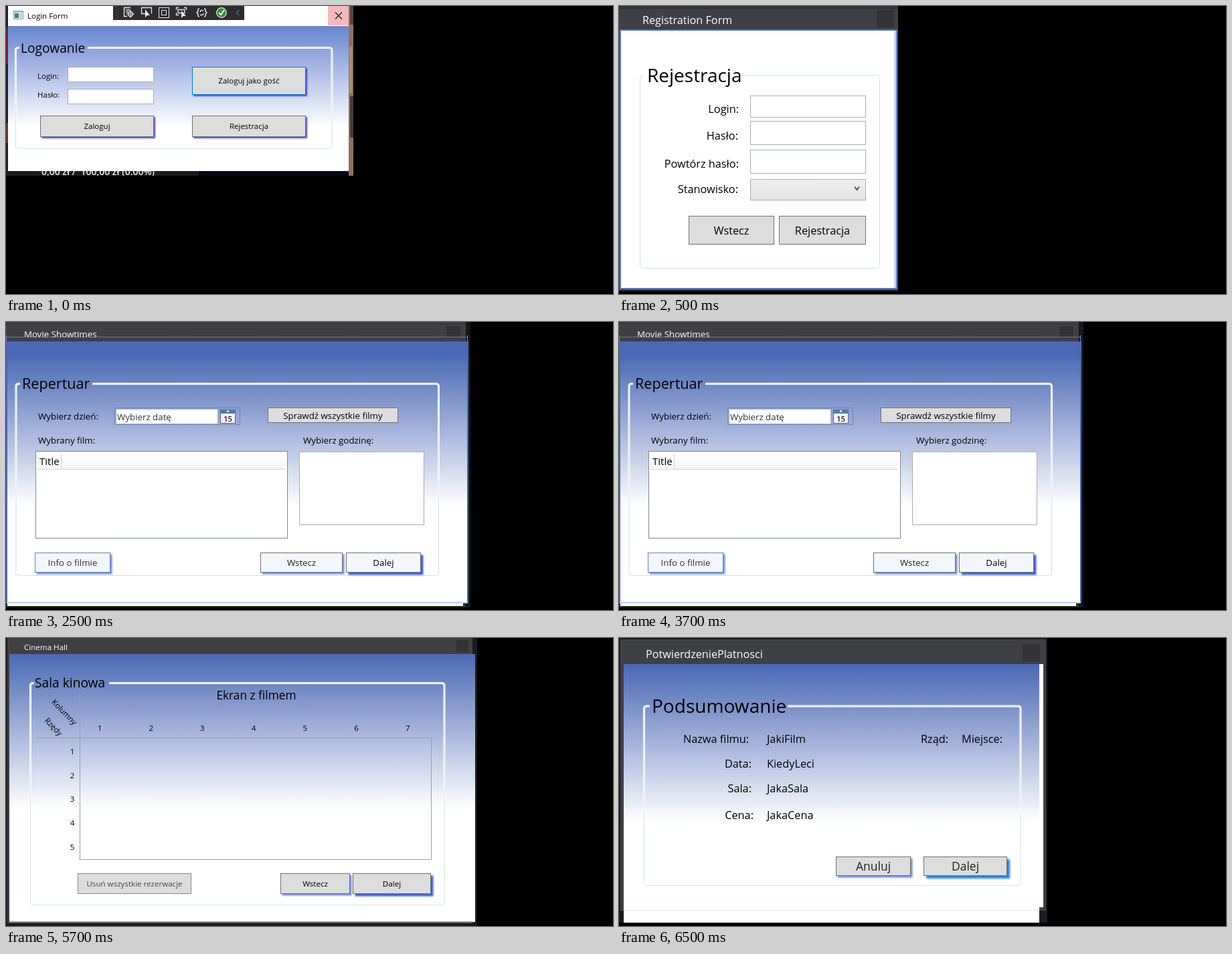
Write an HTML page that moves like this. It is 907x431 px and loops after 8 s.

```html
<!DOCTYPE html>
<html lang="pl">
<head>
<meta charset="utf-8">
<title>Cinema booking windows</title>
<style>
html, body { margin: 0; width: 100%; height: 100%; overflow: hidden; background: #000; }
svg { display: block; }
text { font-family: "Open Sans", "Noto Sans", sans-serif; white-space: pre; }
</style>
</head>
<body>
<svg id="stage" width="907" height="431" viewBox="0 0 907 431"></svg>
<script>
const WHITE = '#fff', BAR = '#3f3f46', FACE = '#ddd', EDGE = '#707070', FIELD = '#abadb3';

const rect = (x, y, w, h, fill, extra = '') =>
  `<rect x="${x}" y="${y}" width="${w}" height="${h}" fill="${fill}" ${extra}/>`;
const box = (x, y, w, h, fill, stroke, extra = '') =>
  rect(x + .5, y + .5, w - 1, h - 1, fill, `stroke="${stroke}" ${extra}`);
const line = (d, color, width = 1, extra = '') =>
  `<path d="${d}" fill="none" stroke="${color}" stroke-width="${width}" ${extra}/>`;
const text = (x, y, size, str, anchor = 'start', fill = '#000', extra = '') =>
  `<text x="${x}" y="${y}" font-size="${size}" text-anchor="${anchor}" fill="${fill}" ${extra}>${str}</text>`;
const mid = (x, y, size, str) => text(x, y, size, str, 'middle');

const gradient = (id, y1, y2, color) =>
  `<linearGradient id="${id}" gradientUnits="userSpaceOnUse" x1="0" x2="0" y1="${y1}" y2="${y2}">
   <stop stop-color="${color}"/><stop offset="1" stop-color="#fff"/></linearGradient>`;
const shadow = (id, d, blur, color) =>
  `<filter id="${id}" x="-10%" y="-30%" width="120%" height="180%">
   <feDropShadow dx="${d}" dy="${d}" stdDeviation="${blur}" flood-color="${color}"/></filter>`;

function button(x, y, w, h, size, str, o = {}) {
  const filter = o.shadow ? `filter="url(#${o.shadow})"` : '';
  return box(x, y, w, h, o.fill || FACE, o.edge || EDGE, filter) +
    text(x + w / 2, y + h / 2 + size * .38, size, str, 'middle', o.ink || '#000');
}

// Frame whose top edge is open between g1 and g2 for the heading
function group(x, y, r, b, g1, g2, glow = true) {
  const d = `M${g2} ${y}H${r - 4}q4 0 4 4V${b - 4}q0 4 -4 4H${x + 4}q-4 0 -4 -4V${y + 4}q0 -4 4 -4H${g1}`;
  return (glow ? line(d, WHITE, 3) : '') + line(d, '#d5dfe5');
}

function toolbar() {
  const c = '#e8e8e8';
  let dots = '';
  for (let y = 2; y < 19; y += 4) dots += rect(164, y, 1, 1, '#777') + rect(167, y + 2, 1, 1, '#777');
  return rect(160, 0, 196, 21, '#2d2d30') + dots +
    line('M186 2.5H176.5V15.5H181M179 6H186M179 9H183', c, 1.4) +
    `<circle cx="186" cy="12" r="3.5" fill="none" stroke="${c}" stroke-width="1.4"/>` +
    line('M186 6V18M180 12H192', c) +
    line('M208 11.5H202.5V2.5H217.5V11.5', c, 1.3) +
    `<path d="M208 5V17L211 14H215Z" fill="${c}"/>` +
    box(228, 2, 16, 16, 'none', c) + box(232, 6, 8, 8, 'none', c) +
    line('M254.5 6V2.5H258M266 2.5H269.5V6M254.5 10V13.5H258M257 5.5H267V10.5H257Z', c, 1.3) +
    `<path d="M262 7V18L265 15H269Z" fill="${c}"/>` +
    line('M289 4Q286 4 287 8L285 10L287 12Q286 16 289 16M296 4Q299 4 298 8L300 10L298 12Q299 16 296 16', c, 1.5) +
    line('M290 9Q291 5 295 7M295 11Q294 15 290 13', c, 1.4) +
    `<circle cx="322" cy="10" r="7.3" fill="#388a34" stroke="${c}" stroke-width="1.2"/>` +
    line('M318 10L321 13L326 6', WHITE, 1.8) +
    line('M348.5 6L344 10L348.5 14', '#66666a', 1.2);
}

function login() {
  let s = rect(0, 0, 519, 254, '#111') + rect(0, 247, 288, 7, '#1d1d1f') +
    rect(288, 247, 231, 7, '#080714') + rect(0, 0, 3, 247, '#20202c') +
    rect(0, 32, 3, 55, '#6b2930') + rect(0, 175, 3, 30, '#70303a') +
    rect(512, 0, 7, 254, '#8b7362') + rect(514, 0, 5, 28, '#59453a') +
    rect(513, 60, 4, 70, '#a88f7a') + rect(514, 135, 5, 62, '#443a35');
  s += `<g clip-path="url(#strip)">${text(137.5, 253, 14, '0,00 zł /  100,00 zł (0.00%)', 'middle', '#eee', 'font-weight="600"')}</g>`;
  s += rect(3, 0, 509, 247, WHITE) + rect(3, 30, 509, 217, 'url(#g0)') + rect(481, 0, 31, 29, '#f4b8bf') +
    line('M492 9.5L502 19.5M502 9.5L492 19.5', '#111', 1.1) +
    box(11, 7, 15, 13, '#e9eef2', '#8d969c') + rect(12, 8, 13, 2, '#b8c4cc') +
    rect(13, 11, 6, 7, '#3b7d8c') + rect(20, 11, 4, 7, '#c9d0d4') +
    text(32, 19, 11.5, 'Login Form') + toolbar();
  s += group(14.5, 62.5, 487, 213, 20, 122) + text(22, 70, 19.2, 'Logowanie') +
    text(47, 109, 11.5, 'Login:') + text(47, 137, 11.5, 'Hasło:') +
    box(92, 91, 129, 23, WHITE, FIELD) + box(92, 124, 129, 23, WHITE, FIELD);
  return s + button(278, 91, 170, 42, 11.5, 'Zaloguj jako gość', { shadow: 'violet', edge: '#0078d7' }) +
    button(51, 164, 170, 32, 11.5, 'Zaloguj', { shadow: 'violet' }) +
    button(278, 164, 170, 32, 11.5, 'Rejestracja', { shadow: 'violet' });
}

function register() {
  let s = rect(0, 0, 417, 426, BAR) + rect(0, 0, 417, 3, '#36363c') + rect(0, 3, 417, 1, '#2b2b30') +
    rect(385, 6, 26, 26, '#333338') + text(35, 27, 16.2, 'Registration Form', 'start', WHITE) +
    rect(1, 35, 415, 389, '#5874b8') + rect(3, 37, 411, 385, WHITE) + rect(412, 37, 1, 385, '#7f9ade') +
    group(31.5, 103.5, 389.5, 392.5, 39, 183, false) + text(42, 114, 28, 'Rejestracja');
  const rows = [['Login:', 179, 160, 134, 33], ['Hasło:', 178, 200, 172, 36], ['Powtórz hasło:', 179, 242, 215, 36]];
  for (const [label, x, base, y, h] of rows)
    s += text(x, base, 16.3, label, 'end') + box(196, y, 173, h, WHITE, FIELD);
  return s + text(178, 280, 16.3, 'Stanowisko:', 'end') + box(196, 259, 173, 32, 'url(#combo)', '#acacac') +
    line('M352 270.5L355.5 275L359 270.5', '#555', 2) +
    button(104, 314, 128, 43, 16.3, 'Wstecz') + button(239, 314, 130, 43, 16.3, 'Rejestracja');
}

function showtimes() {
  let s = rect(0, 0, 694, 427, '#2a2a2f') + rect(0, 0, 687, 29, BAR) + rect(0, 2, 687, 1, '#33333a') +
    rect(687, 0, 7, 427, '#17171b') + rect(658, 6, 21, 22, '#333338') +
    text(27, 23, 13.3, 'Movie Showtimes', 'start', WHITE) + rect(0, 23, 687, 6, BAR) +
    line('M0 22.5H690', '#a9a9b0', 1, 'stroke-dasharray="1 1"') + line('M.5 20V29M689.5 20V29', '#6b86c7') +
    rect(0, 29, 691, 391, '#4967ae') + rect(2, 30, 687, 390, 'url(#g2)') +
    rect(1, 419, 689, 2, '#b9d0ee') + rect(2, 421, 681, 4, WHITE) +
    group(15, 92.5, 646.5, 379.5, 21, 129) + text(24, 100, 21.6, 'Repertuar');
  s += text(48, 146, 13.3, 'Wybierz dzień:') + box(162, 128, 188, 26, 'none', '#7386ae') +
    box(164, 130, 153, 23, WHITE, '#9fb2d3') + text(166, 147, 13.3, 'Wybierz datę', 'start', '#333') +
    box(320, 131, 23, 21, '#f4f4f4', '#5b6577') + rect(320, 131, 23, 6, '#4f7cab') +
    `<circle cx="331.5" cy="133.5" r="1.6" fill="#fff"/>` + text(331.5, 149, 11.5, '15', 'middle', '#222', 'font-weight="600"') +
    button(391, 128, 195, 23, 13.3, 'Sprawdź wszystkie filmy') +
    text(48, 182, 13.3, 'Wybrany film:') + text(444, 182, 13.3, 'Wybierz godzinę:');
  s += box(44, 193, 377, 131, WHITE, '#828790') + rect(47, 196, 370, 24, 'url(#head)') +
    line('M47 220.5H417M82.5 197V220', '#d5d5d5') + text(50, 214, 15, 'Title') +
    box(438, 194, 187, 110, WHITE, FIELD);
  return s + button(43, 345, 113, 30, 13.3, 'Info o filmie', { shadow: 'blue', fill: '#f3f7fd', edge: '#6c82ad', ink: '#333' }) +
    button(380, 345, 123, 30, 13.3, 'Wstecz', { shadow: 'blue', fill: '#f3f7fd', ink: '#222' }) +
    button(508, 345, 112, 30, 13.3, 'Dalej', { shadow: 'deep', fill: '#f3f7fd' });
}

function hall() {
  let s = rect(0, 0, 704, 431, '#1b1b1f') + rect(2, 0, 695, 427, BAR) + rect(673, 3, 18, 18, '#333338') +
    text(27, 18, 11.6, 'Cinema Hall', 'start', WHITE) + rect(5, 24, 696, 401, 'url(#g3)') +
    rect(5, 424, 692, 2, '#8b8b90') +
    group(36.5, 67.5, 655, 399.5, 42, 154) + text(43, 74, 19.2, 'Sala kinowa') + mid(374, 92, 17.3, 'Ekran z filmem') +
    text(0, 4, 11.6, 'Kolumny', 'middle', '#000', 'transform="translate(87 111) rotate(46)"') +
    text(0, 4, 11.6, 'Rzędy', 'middle', '#000', 'transform="translate(71 133) rotate(46)"');
  for (let i = 0; i < 7; i++) s += mid(140 + i * 76.7, 139, 11.6, i + 1);
  for (let i = 0; i < 5; i++) s += mid(99, 174 + i * 35.7, 11.6, i + 1);
  return s + line('M45 149.5H635.5V331.5H109M110.5 85V331', '#9a9fa8') +
    button(107, 352, 170, 31, 11.6, 'Usuń wszystkie rezerwacje', { ink: '#444', edge: '#888' }) +
    button(410, 352, 104, 31, 11.6, 'Wstecz', { shadow: 'blue' }) +
    button(518, 352, 117, 31, 11.6, 'Dalej', { shadow: 'deep' });
}

function summary() {
  let s = rect(0, 0, 640, 426, '#1c1c20') + rect(2, 2, 636, 405, BAR) + rect(603, 9, 26, 26, '#333338') +
    text(40, 30, 16.2, 'PotwierdzeniePlatnosci', 'start', WHITE) +
    rect(628, 39, 6, 364, WHITE) + rect(7, 39, 621, 387, 'url(#g4)') +
    line('M2 407.5H638', '#3f5068') + line('M7 407.5H628', '#dce8f4') +
    group(37.5, 102, 600, 370.5, 46, 252) + text(49, 112, 28, 'Podsumowanie');
  const rows = [['Nazwa filmu:', 194, 157, 'JakiFilm'], ['Data:', 198, 194, 'KiedyLeci'],
    ['Sala:', 198, 231, 'JakaSala'], ['Cena:', 201, 271, 'JakaCena']];
  for (const [label, x, y, value] of rows)
    s += text(x, y, 16.3, label, 'end') + text(221, y, 16.3, value);
  return s + text(492, 157, 16.3, 'Rząd:', 'end') + text(573, 157, 16.3, 'Miejsce:', 'end') +
    button(324, 327, 112, 29, 17.5, 'Anuluj', { shadow: 'blue', ink: '#222' }) +
    button(455, 327, 125, 29, 17.5, 'Dalej', { shadow: 'sky', ink: '#222' });
}

const defs = `<defs>
  ${gradient('g0', 30, 181, '#6885d0')}${gradient('g2', 50, 276, '#4b6ab5')}
  ${gradient('g3', 24, 256, '#4b6ab5')}${gradient('g4', 42, 276, '#4b6ab5')}
  <linearGradient id="combo" x2="0" y2="1"><stop stop-color="#f0f0f0"/><stop offset="1" stop-color="#e3e3e3"/></linearGradient>
  <linearGradient id="head" x2="0" y2="1"><stop stop-color="#fff"/><stop offset="1" stop-color="#f5f5f5"/></linearGradient>
  ${shadow('violet', 2, 1.3, '#4a48c8')}${shadow('blue', 2.5, 1.3, '#6d8fe0')}
  ${shadow('deep', 3.5, 1.3, '#3c62cc')}${shadow('sky', 4, 1.5, '#2f7fd6')}
  <clipPath id="strip"><rect x="0" y="247" width="288" height="7"/></clipPath></defs>`;

const stage = document.getElementById('stage');
stage.innerHTML = defs + [login, register, showtimes, hall, summary].map(f => `<g>${f()}</g>`).join('');
const scenes = stage.querySelectorAll(':scope > g');
const starts = [0, 500, 2500, 4500, 6500];

function draw(now) {
  const t = now % 8000;
  const current = starts.filter(s => s <= t).length - 1;
  scenes.forEach((g, i) => g.style.display = i === current ? '' : 'none');
  requestAnimationFrame(draw);
}
draw(performance.now());
</script>
</body>
</html>
```
